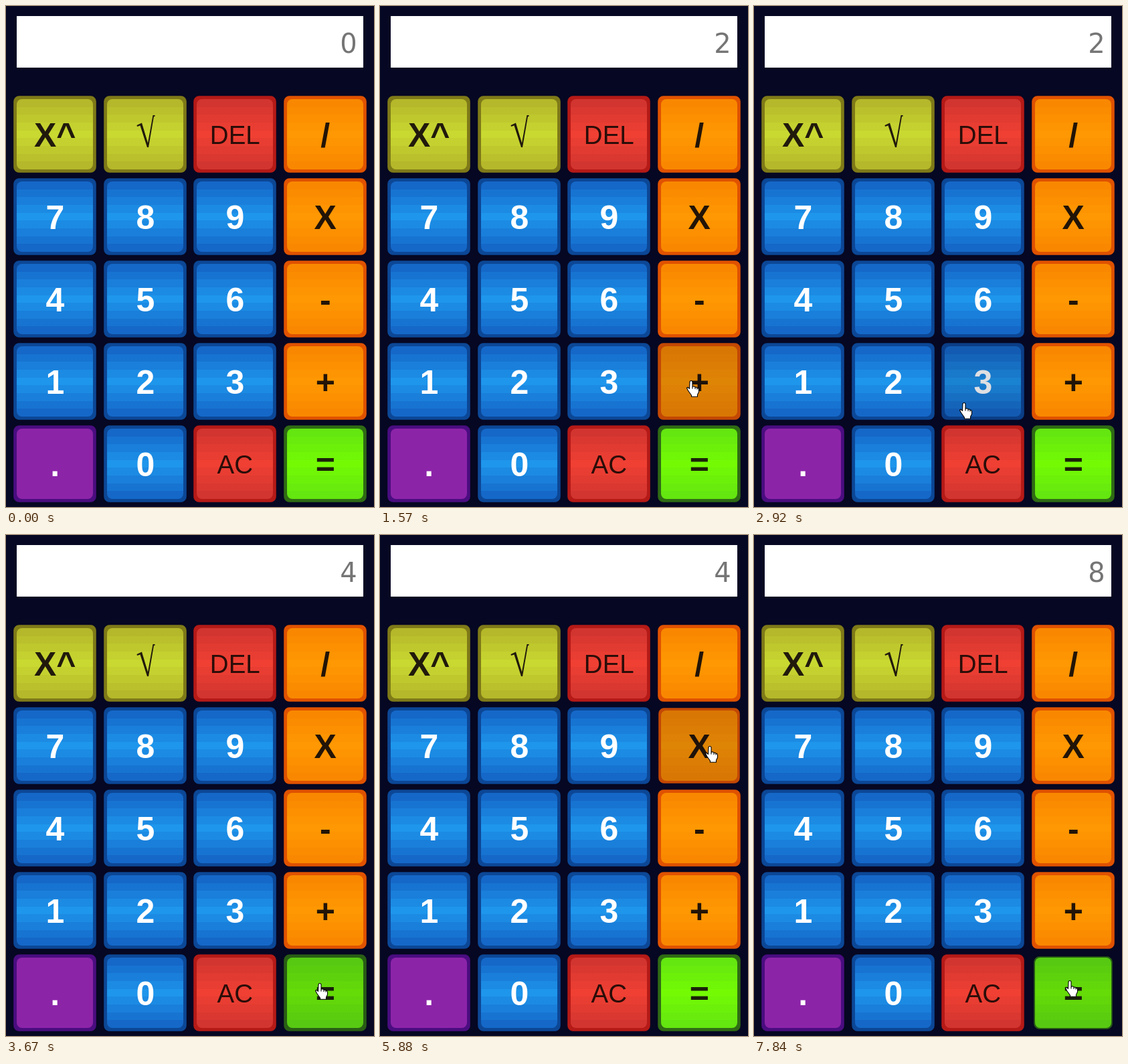
An HTML page for the animation above (7.99 s loop, 550 by 748 pixels).

```html
<!DOCTYPE html>
<html lang="en">
<head>
<meta charset="utf-8">
<title>Calculator</title>
<style>
  html, body { margin: 0; width: 100%; height: 100%; overflow: hidden; background: #060722; }
  svg { display: block; width: 550px; height: 748px; }
  text { text-anchor: middle; font: bold 50px "Liberation Sans", Arial, sans-serif; }
  .word { font-weight: 400; font-size: 38.5px; }
  #display { font: 40px "DejaVu Sans", Verdana, sans-serif; fill: #757575; }
</style>
</head>
<body>
<svg viewBox="0 0 550 748">
  <defs></defs>
  <rect width="550" height="748" fill="#060722"/>
  <rect x="16" y="15" width="518" height="77" fill="#fff"/>
  <text id="display" x="512" y="69.5">0</text>
  <g id="keys"></g>
  <path id="cursor" fill="#fff" stroke="#000" stroke-width="1.1" stroke-linejoin="round"/>
</svg>
<script>
const LOOP = 7990, TICK = LOOP / 60;
const KEY_W = 124, KEY_H = 115, RIM = 5;
const SHOW_DELAY = 125, HOLD = 280;
const BANDS = 9;
const $ = s => document.querySelector(s);

function set(el, attrs) {
  for (const k in attrs) el.setAttribute(k, attrs[k]);
  return el;
}

function add(parent, tag, attrs, text = '') {
  const el = set(document.createElementNS('http://www.w3.org/2000/svg', tag), attrs);
  el.textContent = text;
  parent.append(el);
  return el;
}

const STYLES = {
  olive:  { rim: '#7f7a18', edge: '#b5b82a', mid: '#c9d931', ink: '#211a0c' },
  red:    { rim: '#b51a17', edge: '#d23530', mid: '#f04033', ink: '#2b0d09' },
  orange: { rim: '#e05200', edge: '#f98800', mid: '#ff9802', ink: '#221407' },
  blue:   { rim: '#0c4796', edge: '#1568c8', mid: '#1e96ec', ink: '#fff' },
  purple: { rim: '#4a0d80', edge: '#8c24a8', mid: '#8c24a8', ink: '#fff' },
  green:  { rim: '#2f6b14', edge: '#64e610', mid: '#74fb04', ink: '#1b2208' }
};

// Mirrored vertical gradient made of flat bands
for (const [id, { edge, mid }] of Object.entries(STYLES)) {
  const grad = add($('defs'), 'linearGradient', { id, x2: 0, y2: 1 });
  for (let i = 0; i < BANDS; i++) {
    const share = 100 - 100 * Math.abs(2 * i / (BANDS - 1) - 1);
    for (const offset of [i / BANDS, (i + 1) / BANDS])
      add(grad, 'stop', { offset }).style.stopColor = `color-mix(in srgb, ${mid} ${share}%, ${edge})`;
  }
}

function styleOf(label) {
  if (/^\d$/.test(label)) return 'blue';
  if (label === '.') return 'purple';
  if (label === '=') return 'green';
  if (/^(DEL|AC)$/.test(label)) return 'red';
  return /^(X\^|√)$/.test(label) ? 'olive' : 'orange';
}

const keys = 'X^ √ DEL / 7 8 9 X 4 5 6 - 1 2 3 + . 0 AC ='.split(' ').map((label, i) => {
  const x = 11 + Math.round(i % 4 * 134.7);
  const y = 134 + Math.floor(i / 4) * 123;
  const style = styleOf(label);
  const { rim: border, ink } = STYLES[style];
  const g = add($('#keys'), 'g', {});
  const rim = add(g, 'rect', { fill: border, stroke: border, 'stroke-opacity': .55, rx: 8 });
  add(g, 'rect', {
    x: x + RIM, y: y + RIM, width: KEY_W - 2 * RIM, height: KEY_H - 2 * RIM, rx: 8, fill: `url(#${style})`
  });
  if (label === '√') {
    add(g, 'path', {
      transform: `translate(${x} ${y + 1})`, fill: ink,
      d: 'M49.5 43l7.5-3.5 9 30L73.5 28h3v2h-1.5L67 76h-2L54.5 43.5l-4.5 1.5z'
    });
  } else {
    const word = style === 'red';
    add(g, 'text', { x: x + 62.3, y: y + (word ? 71.5 : 76), fill: ink, class: word ? 'word' : '' }, label);
  }
  return { label, x, y, g, rim };
});

// Pointer stops: key, offset from its centre, travel times, optional press time
const START = { x: 294, y: 742 };
const STOPS = [
  { key: '2', dx: 26,  dy: 22,  leave: 280,  arrive: 790,  press: 1060 },
  { key: '+', dx: -12, dy: -1,  leave: 1190, arrive: 1570, press: 1690 },
  { key: '2', dx: 26,  dy: 22,  leave: 2100, arrive: 2530, press: 2790 },
  { key: '3', dx: -28, dy: 32,  leave: 2795, arrive: 2920 },
  { key: '=', dx: -8,  dy: -14, leave: 2950, arrive: 3380, press: 3380 },
  { key: '+', dx: -5,  dy: 34,  leave: 4050, arrive: 4650 },
  { key: 'X', dx: 16,  dy: 1,   leave: 5150, arrive: 5600, press: 5880 },
  { key: '2', dx: 49,  dy: -42, leave: 6000, arrive: 6650 },
  { key: '2', dx: 22,  dy: 16,  leave: 6700, arrive: 6810, press: 7060 },
  { key: '=', dx: -5,  dy: -18, leave: 7180, arrive: 7700, press: 7710 }
].map(stop => {
  const { x, y } = keys.find(k => k.label === stop.key);
  return { ...stop, x: x + KEY_W / 2 + stop.dx, y: y + KEY_H / 2 + stop.dy };
});

const HAND = 'M-2 2a2 2 0 0 1 4 0v7l1-.8 2 .3 1 1.2 2-.2 1 1.3h1.6l.9 2v4l-2 4v3h-9v-2l-5-7-2-4 1.5-1 2.5 2z' +
             'M2 8v4M6 9.5v3M9 11v2';
const ARROW = 'M0 0v16l4-3.5 2.5 6.5 3-1.2-2.6-6.3h5z';

// The pointer moves in ticks, easing from stop to stop
function pointer(t) {
  const now = Math.floor(t / TICK + .3) * TICK;
  const i = Math.max(0, STOPS.findLastIndex(s => now >= s.leave));
  const from = STOPS[i - 1] || START, to = STOPS[i];
  const f = Math.min(1, Math.max(0, (now - to.leave) / (to.arrive - to.leave)));
  const e = f * f * (3 - 2 * f);
  return { x: from.x + (to.x - from.x) * e, y: from.y + (to.y - from.y) * e };
}

const OPS = { '+': (a, b) => a + b, 'X': (a, b) => a * b };

// Works out the display from the keys pressed so far
function calculate(t) {
  let total = 0, shown = 0, op = null;
  for (const { key, press } of STOPS) {
    if (!press || t < press + SHOW_DELAY) continue;
    if (key === '=') shown = OPS[op](total, shown);
    else if (OPS[key]) [total, shown, op] = [shown, 0, key];
    else shown = +key;
  }
  return shown;
}

function draw(t) {
  const { x: px, y: py } = pointer(t);
  const pressed = STOPS.find(s => t >= s.press && t < s.press + HOLD);
  const inset = 14;
  let hovering = false;
  for (const { label, x, y, g, rim } of keys) {
    const over = t >= STOPS[0].leave &&
      Math.abs(px - x - KEY_W / 2) < KEY_W / 2 - inset && Math.abs(py - y - KEY_H / 2) < KEY_H / 2 - inset;
    hovering ||= over;
    const cut = over && pressed?.key === label ? Math.min(3, 1 + 2 * (t - pressed.press) / SHOW_DELAY) : 0;
    set(g, { opacity: over ? .87 : 1 });
    set(rim, {
      x: x + .5 + cut, y: y + .5 + cut,
      width: KEY_W - 1 - 2 * cut, height: KEY_H - 1 - 2 * cut
    });
  }
  $('#display').textContent = calculate(t);
  set($('#cursor'), {
    visibility: t >= STOPS[0].leave ? 'visible' : 'hidden',
    d: hovering ? HAND : ARROW,
    transform: `translate(${px} ${py})`
  });
}

const began = performance.now();
function tick() {
  draw((performance.now() - began) % LOOP);
  requestAnimationFrame(tick);
}
tick();
</script>
</body>
</html>
```
